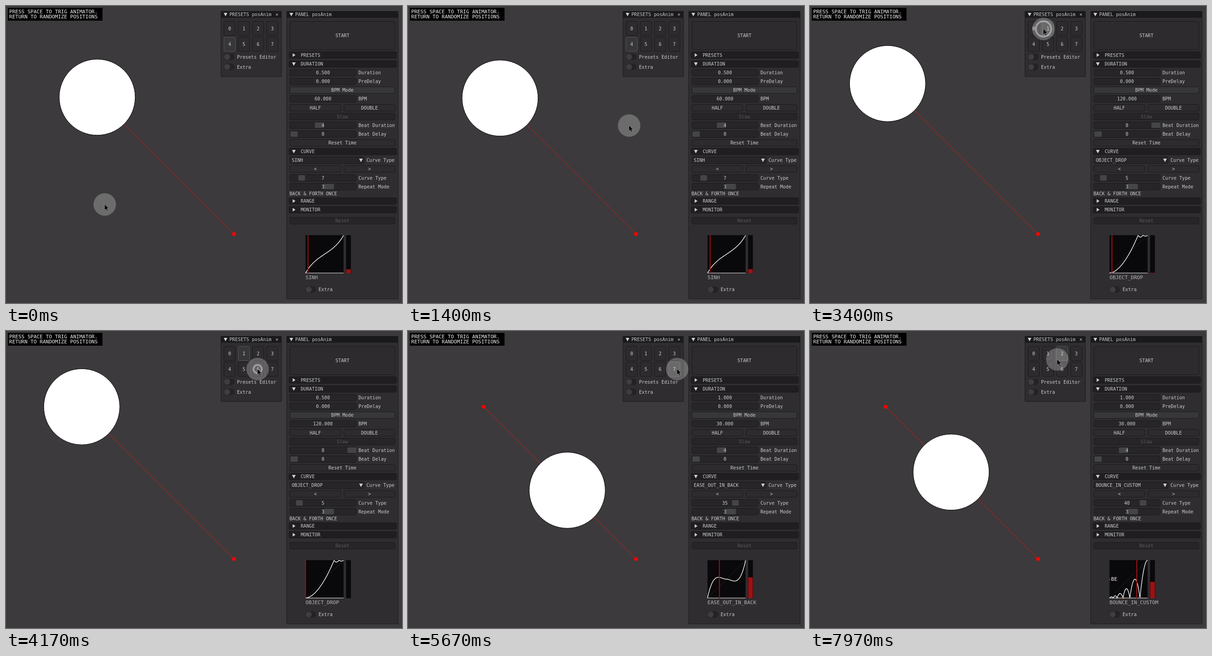
Write an HTML page that moves like this. It is 864 px wide and 648 px high and loops after 8 s.

```html
<!DOCTYPE html>
<html lang="en">
<head>
<meta charset="utf-8">
<title>Position animator</title>
<style>
  html, body { margin: 0; width: 100%; height: 100%; overflow: hidden; background: #3c3a3c; }
  svg { display: block; width: 864px; height: 648px; }
  text { font: 10.17px "DejaVu Sans Mono", "Liberation Mono", monospace; fill: #cbcbcb; white-space: pre; }
  .big { font-size: 11.05px; fill: #f2f2f2; }
  .plot { font-size: 11.05px; fill: #b4b4b4; }
  .mid { text-anchor: middle; }
  .off { fill: #5b595c; }
</style>
</head>
<body>
<svg id="stage" viewBox="0 0 864 648"></svg>
<script>
const LOOP = 8000, STEP = 100 / 3;
const stage = document.getElementById('stage');
const FRAME = '#272528', BUTTON = '#2d2b2e', EDGE = '#19181a', GRAB = '#454446', RED = '#a30f10';

function add(tag, attrs, body) {
  const el = document.createElementNS('http://www.w3.org/2000/svg', tag);
  set(el, attrs);
  if (body !== undefined) el.textContent = body;
  stage.appendChild(el);
  return el;
}
function set(el, attrs) {
  for (const k in attrs) el.setAttribute(k, attrs[k]);
}
// Text is placed by the middle of its capitals.
const label = (s, x, y, cls = '') => add('text', { x, y: y + 3.7, class: cls }, s);
const rect = (x, y, width, height, fill, more = {}) => add('rect', { x, y, width, height, fill, ...more });
const disc = (cx, cy, r, fill, more = {}) => add('circle', { cx, cy, r, fill, ...more });
const box = (x1, x2, y, h = 14.5, fill = FRAME) =>
  rect(x1 + .5, y - h / 2, x2 - x1 - 1, h, fill, { rx: 3, stroke: EDGE });

function button(s, x1, x2, y, h, fill = BUTTON, cls = '') {
  const el = box(x1, x2, y, h, fill);
  label(s, (x1 + x2) / 2, y, 'mid ' + cls);
  return el;
}
function triangle(x, y, down) {
  const d = down ? `M${x - 4} ${y - 3.5}h8l-4 7.5z` : `M${x - 2.5} ${y - 4}v8l6 -4z`;
  add('path', { d, fill: '#d2d2d2' });
}
function slider(name, y, value, grabX, grabW) {
  box(619, 764.5, y);
  const grab = grabW ? rect(grabX, y - 6, grabW, 12, GRAB, { rx: 1.5 }) : null;
  const text = label(value, 691.5, y, 'mid');
  label(name, 769, y);
  return { grab, text };
}
function header(s, y, open) {
  box(617, 852.5, y, 14.5, '#201e21');
  triangle(628, y, open);
  label(s, 643, y);
}
function toggle(s, x, y) {
  rect(x, y - 7, 23, 14, '#242225', { rx: 7 });
  disc(x + 7, y, 6.3, '#3e3d3f');
  label(s, x + 28.5, y);
}
function pane(title, x, y, w, h) {
  rect(x, y, w, h, '#2f2d30', { stroke: EDGE, rx: 1 });
  rect(x, y, w, 14, '#1a191b');
  triangle(x + 10, 18.5, true);
  label(title, x + 18.5, 18.5);
}

// Curves map 0..1 to 0..1.
const sinh = x => .5 + Math.sinh(1.6 * (2 * x - 1)) / (2 * Math.sinh(1.6));
function drop(x) {
  if (x < .75) return Math.pow(x / .75, 1.8);
  const [a, h] = x < .88 ? [.75, .045] : [.88, .018];
  return 1 - h * Math.sin(Math.PI * Math.min(1, (x - a) / .125));
}
function camel(x) {
  if (x < .08) return 1 - Math.pow(1 - x / .08, 1.2);
  return x < .19 ? 1 : Math.pow((1 - x) / .81, 1.15);
}
const logistic = x => 1 / (1 + Math.exp(-11 * (x - .5)));
const sigmoid = x => (logistic(x) - logistic(0)) / (logistic(1) - logistic(0));
function outInBack(x) {
  const c = 1.70158, u = 2 * x - 1;
  return .5 + .5 * ((c + 1) * u ** 3 + (x < .5 ? c : -c) * u * u);
}
const ARCS = [[0, .1, .03], [.1, .2, .06], [.2, .355, .12], [.355, .535, .25], [.535, .8, .5], [.8, 1.2, 1]];
function bounce(x) {
  const [a, b, h] = ARCS.find(arc => x <= arc[1]);
  const u = (2 * x - a - b) / (b - a);
  return h * (1 - u * u);
}

const preset = (slot, name, curve, type, bpm = 60, beats = 4, duration = .5) =>
  ({ slot, name, curve, type, bpm, beats, duration });
const SINH = preset(4, 'SINH', sinh, 7);
const DROP = preset(1, 'OBJECT_DROP', drop, 5, 120, 8);
const CAMEL = preset(6, 'CUBIC_BEZIER_CAMEL_LIKE', camel, 52);
const SIGMOID = preset(3, 'EXPONENTIAL_SIGMOID_PARAM', sigmoid, 14);
const BACK = preset(7, 'EASE_OUT_IN_BACK', outInBack, 35, 30, 4, 1);
const BOUNCE = preset(2, 'BOUNCE_IN_CUSTOM', bounce, 40, 30, 4, 1);

// Start time, preset
const RUNS = [
  [-16, SINH], [917, SINH], [2235, SINH], [3384, DROP], [4249.6, CAMEL],
  [4867, SIGMOID], [5510, BACK], [6125, BACK], [7608, BOUNCE]
];
// Press time of each mouse click, and whether it is on START
const PRESSES = [[2170, 1], [3255, 0], [4150, 0], [4770, 0], [5410, 0], [6025, 1], [7500, 0]];
// Time, x, y of the pointer
const PATH = [
  [900, 215.5, 433], [933, 216.5, 434], [1300, 430, 300], [1700, 766, 49], [1800, 771, 41],
  [2150, 734, 52], [2450, 734, 52], [2600, 728, 50], [2830, 727, 48.5], [2960, 727, 48.5],
  [3010, 738, 50], [3280, 510, 50], [3500, 509, 50], [3790, 520, 58], [4150, 549, 83],
  [4350, 549, 83], [4733, 568, 62], [4800, 580, 56], [5000, 580, 56], [5400, 580, 84],
  [5620, 580, 84], [6000, 756, 60], [6290, 758, 60], [6650, 545.5, 53], [6700, 545, 52.5],
  [7430, 545, 53], [7600, 546, 56], [7966, 539.5, 62]
];
const ease = u => u * u * (3 - 2 * u);
function pointer(t) {
  const i = PATH.findIndex(p => p[0] > t);
  if (i === 0) return PATH[0].slice(1);
  if (i < 0) return PATH[PATH.length - 1].slice(1);
  const a = PATH[i - 1], b = PATH[i], u = ease((t - a[0]) / (b[0] - a[0]));
  return [a[1] + (b[1] - a[1]) * u, a[2] + (b[2] - a[2]) * u];
}

// Scene
const A = 165.3, SPAN = 332.2;
add('path', {
  d: `M${A} ${A}l${SPAN} ${SPAN}`, stroke: '#dc1010', 'stroke-width': 1, 'shape-rendering': 'crispEdges'
});
for (const p of [A, A + SPAN]) disc(p, p, 4.2, '#ff0000');
const ball = disc(0, 0, 82.9, '#fff', { stroke: '#000', 'stroke-width': 1 });

rect(4, 4, 206.5, 28, '#000');
label('PRESS SPACE TO TRIG ANIMATOR.', 7, 12.5, 'big');
label('RETURN TO RANDOMIZE POSITIONS', 7, 23, 'big');

// Preset window
pane('PRESETS posAnim', 469, 11.5, 132, 142.5);
label('×', 591, 18.5, 'mid');
const slots = [];
for (let i = 0; i < 8; i++) {
  const x = 475 + (i % 4) * 31;
  slots.push(button(i, x, x + 26, i < 4 ? 49 : 83.5, 31));
}
toggle('Presets Editor', 475.5, 111);
toggle('Extra', 475.5, 133);

// Main panel
pane('PANEL posAnim', 612.5, 11.5, 243, 627.5);
const start = button('START', 619, 849, 64.5, 62);
header('PRESETS', 107, false);
header('DURATION', 126.5, true);
const duration = slider('Duration', 145.5, '');
slider('PreDelay', 164.5, '0.000');
button('BPM Mode', 619, 849, 183.5, 14.5, '#373638');
const bpm = slider('BPM', 202.5, '');
button('HALF', 619, 731, 222);
button('DOUBLE', 737, 849, 222);
button('Slow', 619, 849, 241, 14.5, FRAME, 'off');
const beats = slider('Beat Duration', 260, '', 674, 19.5);
slider('Beat Delay', 279.5, '0', 620.5, 16);
button('Reset Time', 619, 849, 298.5);
header('CURVE', 317.5, true);
box(619, 782, 336.5);
const combo = label('', 623.5, 336.5);
triangle(774.5, 336.5, true);
label('Curve Type', 786.5, 336.5);
button('<', 619, 731, 355.5);
button('>', 737, 849, 355.5);
const type = slider('Curve Type', 375, '', 0, 14.5);
slider('Repeat Mode', 394, '3', 692, 23.5);
label('BACK & FORTH ONCE', 618.5, 409.5);
header('RANGE', 425.5, false);
header('MONITOR', 444.5, false);
button('Reset', 619, 849, 468.5, 14.5, FRAME, 'off');

// Curve plot
const PX = 653.5, PY = 583, SIZE = 83;
rect(PX, 500, SIZE, SIZE, '#09080a');
rect(742, 500, 10.5, SIZE, '#09080a');
add('path', { d: `M${PX} ${PY}l${SIZE} ${-SIZE}`, stroke: '#222124', 'stroke-width': 1 });
add('path', { d: `M${PX} 582.5h${SIZE}`, stroke: '#e8e8e8', 'stroke-width': 1 });
const graph = add('path', { fill: 'none', stroke: '#fff', 'stroke-width': 1.4 });
const marker = rect(0, 500, 2, SIZE, RED);
const bar = rect(742.5, 0, 9.5, 0, RED);
const camelMarks = [
  add('text', { x: 660, y: 507, style: 'fill:#28d4d8' }, 'A'),
  add('text', { x: 678.5, y: 524, style: 'fill:#b414b4' }, 'B')
];
const bounceMarks = [
  disc(654, 542, 1.5, '#a010a0'),
  label('BE', 657, 541.5, 'big'),
  disc(683.5, 582.5, 1.7, '#e89a10')
];
const plotName = label('', 653.5, 592, 'plot');
toggle('Extra', 653.5, 618.5);

// Pointer
const halo = disc(0, 0, 24.5, '#fff', { 'fill-opacity': .25 });
const ring = disc(0, 0, 0, 'none', { stroke: '#fff', 'stroke-width': 4 });
const arrow = add('path', {
  d: 'M0 0V13L3 10.3 5.2 15 7.4 14 5.2 9.5H9.3Z', fill: '#000', stroke: '#a8a8a8', 'stroke-width': .7
});

const show = (els, on) => els.forEach(el => el.style.display = on ? '' : 'none');
let current = null;
function load(p) {
  if (p === current) return;
  current = p;
  slots.forEach((el, i) => set(el, i === p.slot
    ? { fill: '#373638', stroke: '#555456' } : { fill: BUTTON, stroke: EDGE }));
  duration.text.textContent = p.duration.toFixed(3);
  bpm.text.textContent = p.bpm.toFixed(3);
  beats.text.textContent = p.beats;
  beats.grab.setAttribute('x', p.beats === 8 ? 745 : 674);
  type.text.textContent = p.type;
  type.grab.setAttribute('x', 620.6 + 2.47 * p.type);
  plotName.textContent = p.name;
  // The combo box cuts off names that run under its arrow.
  combo.textContent = p.name.slice(0, 23);
  let d = '';
  for (let i = 0; i <= 166; i++) {
    const x = i / 166;
    d += `${i ? 'L' : 'M'}${(PX + SIZE * x).toFixed(1)} ${(PY - .5 - (SIZE - 1) * p.curve(x)).toFixed(1)}`;
  }
  graph.setAttribute('d', d);
  show(camelMarks, p === CAMEL);
  show(bounceMarks, p === BOUNCE);
}

function draw(t) {
  const [begin, p] = RUNS.filter(r => r[0] <= t).pop();
  load(p);

  const turn = (t - begin) / (p.duration * 500);
  const phase = turn >= 2 ? 0 : turn > 1 ? 2 - turn : turn;
  const value = Math.max(0, p.curve(phase));
  const at = A + SPAN * value;
  set(ball, { cx: at, cy: at });
  marker.setAttribute('x', PX - 1 + SIZE * phase);
  set(bar, { y: PY - SIZE * value, height: SIZE * value });

  const [x, y] = pointer(t);
  set(halo, { cx: x, cy: y });
  arrow.setAttribute('transform', `translate(${x - .5} ${y - .5})`);
  const press = PRESSES.find(c => t >= c[0] && t < c[0] + 220);
  const age = press ? t - press[0] : 0;
  set(ring, {
    cx: x, cy: y, r: 8 + age * .06,
    'stroke-opacity': press ? .38 * Math.min(1, (220 - age) / 70) : 0
  });
  start.setAttribute('fill', press && press[1] ? '#323432' : BUTTON);
}

function tick(now) {
  const t = now % LOOP;
  draw(Math.floor((t + 4) / STEP) * STEP);
  requestAnimationFrame(tick);
}
draw(0);
requestAnimationFrame(tick);
</script>
</body>
</html>
```
